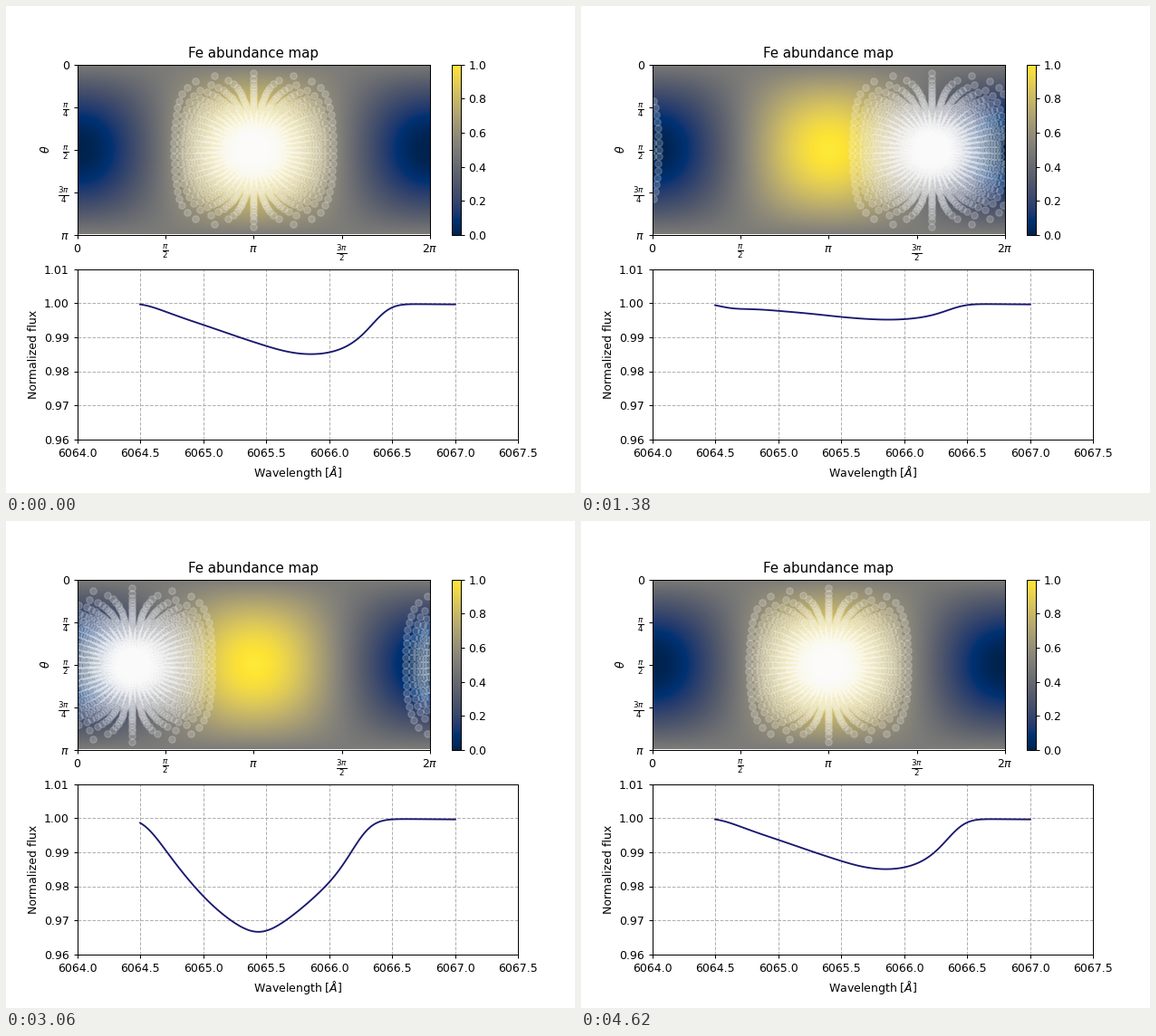
A matplotlib script that plays this animation: 628 px wide and 538 px high, repeating every 4.64 s.

```python
import numpy as np
import matplotlib.pyplot as plt
from matplotlib.animation import FuncAnimation

DPI = 90
TICK_MS = 20
TICKS = 232          # one loop of 4640 ms
STEPS = 99           # rotation steps per turn
TURN = 2 * np.pi

LINE_CENTRE = 6065.485
MAX_SHIFT = 0.93     # Doppler shift at the limb
LINE_WIDTH = 0.1     # sigma of the local line
# Local line depth (1e-4) every 30 degrees of longitude, with a jump at +-180
LOCAL_DEPTH = [22, 24, 33, 46, 64, 86, 122, 170, 232, 303, 346, 280, 250]

plt.rcParams.update({"font.family": "DejaVu Sans", "font.size": 10})


def disk_grid(rings, spokes):
    """Polar grid on the visible disk: x, y and depth z towards the viewer."""
    r = (np.arange(rings) + 0.5) / rings
    a = TURN * np.arange(spokes) / spokes
    r, a = [g.ravel() for g in np.meshgrid(r, a, indexing="ij")]
    return r * np.cos(a), r * np.sin(a), np.sqrt(1 - r ** 2)


def spectra(wave):
    """Flux at every step, summed over the limb-darkened rotating disk."""
    x, y, z = disk_grid(90, 180)
    weight = np.hypot(x, y) * (0.4 + 0.6 * z)
    shift = wave[:, None] - LINE_CENTRE - MAX_SHIFT * x
    profile = weight * np.exp(-0.5 * (shift / LINE_WIDTH) ** 2)
    profile /= profile.sum(axis=1).max()

    turned = TURN * np.arange(STEPS + 1) / STEPS
    lon = (np.arctan2(x, z)[:, None] - turned + np.pi) % TURN - np.pi
    nodes = np.linspace(-np.pi, np.pi, len(LOCAL_DEPTH))
    depth = profile @ np.interp(lon, nodes, LOCAL_DEPTH)
    red_wing = 4 * ((wave - wave[0]) / np.ptp(wave)) ** 2
    return 1 - 1e-4 * (depth.T + red_wing)


def step_at(tick):
    """Steps last 20, 100 and 20 ms in turn."""
    group, rest = divmod(tick, 7)
    return 3 * group + (rest > 0) + (rest > 5)


wave = np.linspace(6064.5, 6067, 126)
flux = spectra(wave)
x, y, z = disk_grid(43, 48)
lon, colat = np.arctan2(x, z), np.arccos(y)

fig, (top, low) = plt.subplots(2, 1, figsize=(628 / DPI, 538 / DPI), dpi=DPI)

phi = (np.arange(400) + 0.5) / 400 * TURN
theta = (np.arange(200) + 0.5) / 200 * np.pi
abundance = 0.5 - 0.5 * np.sin(theta)[:, None] * np.cos(phi)
image = top.imshow(abundance, cmap="cividis", vmin=0, vmax=1, aspect="auto",
                   extent=(0, TURN, np.pi * 0.994, 0))
fig.colorbar(image, ax=top)
dots = top.scatter(lon, colat, s=36, color="white", alpha=0.2)
top.set(xlim=(0, TURN), ylim=(np.pi, 0), title="Fe abundance map")
top.set_ylabel(r"$\theta$", labelpad=5)
top.set_xticks(np.arange(5) * np.pi / 2,
               ["0", r"$\frac{\pi}{2}$", r"$\pi$", r"$\frac{3\pi}{2}$", r"$2\pi$"])
top.set_yticks(np.arange(5) * np.pi / 4,
               ["0", r"$\frac{\pi}{4}$", r"$\frac{\pi}{2}$", r"$\frac{3\pi}{4}$", r"$\pi$"])

line, = low.plot(wave, flux[0], color="midnightblue")
low.set(xlim=(6064, 6067.5), ylim=(0.96, 1.01),
        xlabel=r"Wavelength [$\AA$]", ylabel="Normalized flux")
low.grid(linestyle="--")


def draw(tick):
    step = step_at(tick)
    centre = np.pi + TURN * step / STEPS
    dots.set_offsets(np.column_stack([(lon + centre) % TURN, colat]))
    line.set_ydata(flux[step])
    return dots, line


anim = FuncAnimation(fig, draw, frames=TICKS, interval=TICK_MS, repeat=True, repeat_delay=0)
plt.show()
```
